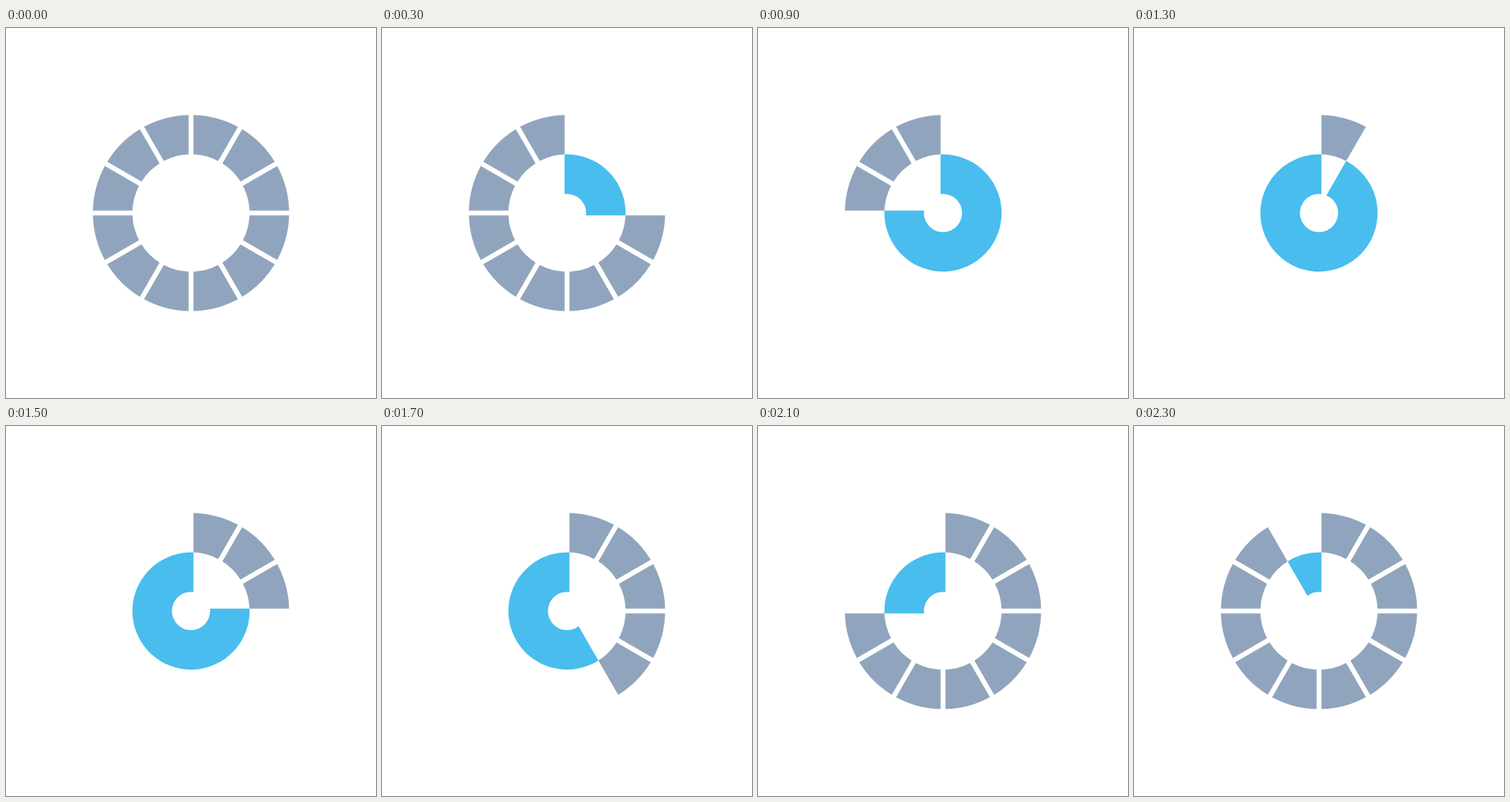
An HTML page with a canvas for the animation above (2.4 s loop, 500 by 500 pixels).

```html
<!DOCTYPE html>
<html lang="en">
<head>
<meta charset="utf-8">
<title>Segmented loader</title>
<style>
  html, body { margin: 0; width: 100%; height: 100%; overflow: hidden; background: #fff; }
  canvas { display: block; }
</style>
</head>
<body>
<canvas id="stage" width="500" height="500"></canvas>
<script>
const ctx = document.getElementById('stage').getContext('2d');
const CELLS = 12, STEP_MS = 100;
const GREY = '#90a5bd', BLUE = '#48bdee';
const OUTER = 132.6, MIDDLE = 79.2, INNER = 25.8;
const HALF_GAP = 3.3;

// Ring sector between two cell borders; its straight sides are shifted
// parallel to the radius, inwards when inset > 0 and outwards when < 0.
function sector(from, to, rOut, rIn, inset, color) {
  const angle = n => n / CELLS * 2 * Math.PI - Math.PI / 2;
  const a = angle(from), b = angle(to);
  const dOut = Math.asin(inset / rOut), dIn = Math.asin(inset / rIn);
  ctx.beginPath();
  ctx.arc(250, 250, rOut, a + dOut, b - dOut);
  ctx.arc(250, 250, rIn, b - dIn, a + dIn, true);
  ctx.closePath();
  ctx.fillStyle = color;
  ctx.fill();
}

function draw(step) {
  // The blue span grows clockwise for one turn, then its start catches up.
  const start = Math.max(0, step - CELLS), end = Math.min(step, CELLS);
  ctx.clearRect(0, 0, 500, 500);
  for (let i = 0; i < CELLS; i++) {
    if (i < start || i >= end) sector(i, i + 1, OUTER, MIDDLE, HALF_GAP, GREY);
  }
  if (end > start) {
    const full = end - start === CELLS;
    sector(start, end, MIDDLE, INNER, full ? 0 : -HALF_GAP, BLUE);
  }
}

const t0 = performance.now();
let shown = -1;
function tick() {
  const step = Math.floor((performance.now() - t0) / STEP_MS) % (2 * CELLS);
  if (step !== shown) draw(shown = step);
  requestAnimationFrame(tick);
}
tick();
</script>
</body>
</html>
```
